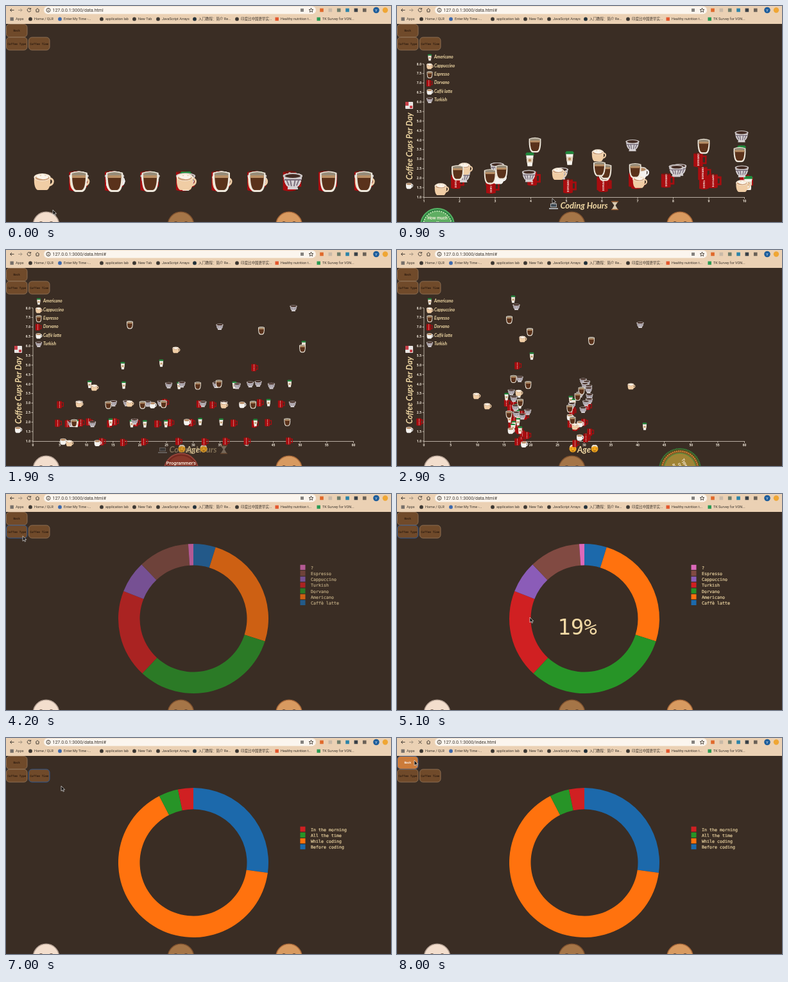
Animation, 600 px wide and 338 px high, one loop 8100 ms. Source, as an HTML page:

```html
<!DOCTYPE html>
<html lang="en">
<head>
<meta charset="utf-8">
<title>Coffee and code</title>
<style>
html, body { margin: 0; width: 100%; height: 100%; overflow: hidden; background: #3a2d24; }
svg { display: block; width: 100%; height: 100%; }
text { white-space: pre; }
.ui { font-family: Roboto, "Noto Sans CJK SC", "Noto Sans CJK", sans-serif; fill: #3b342d; }
.mono { font-family: "DejaVu Sans Mono", monospace; }
.hand { font-family: Lato, sans-serif; font-style: italic; font-weight: 700; fill: #f1d9a5; }
.tick { font-family: "Noto Sans", sans-serif; font-size: 5px; font-weight: 600; fill: #efe6d8; }
</style>
</head>
<body>
<svg id="stage" viewBox="0 0 600 338" preserveAspectRatio="none">
  <defs>
    <g id="americano">
      <path d="M-8-9H8L5 15H-5Z" fill="#f6f3ec"/>
      <path d="M-7.5-3H7.5L6 7H-6Z" fill="#e3d3bd"/>
      <circle cy="2" r="3" fill="#b98b5c"/>
      <path d="M-9-9V-12L-7-15H7L9-12V-9Z" fill="#208a3c"/>
    </g>
    <g id="cappuccino">
      <path d="M8-4C18-6 18 7 7 7" fill="none" stroke="#efcda6" stroke-width="3"/>
      <path d="M-14-6H11C12 6 9 14 5 14H-8C-12 14-15 6-14-6Z" fill="#f0cda5"/>
      <ellipse cx="-1.5" cy="-6" rx="13" ry="6" fill="#f7ead8"/>
      <ellipse cx="-1.5" cy="-5" rx="11" ry="4" fill="#c99a73"/>
      <path d="M-11-6Q-8-12-4-8Q0-13 3-8Q8-10 8-5Q-1 0-11-6Z" fill="#faf4ea"/>
    </g>
    <g id="espresso">
      <path d="M-13-13Q0-18 13-13Q14 17 4 17H-4Q-14 17-13-13Z" fill="#efe9dd"/>
      <path d="M-11-12Q0-16 11-12L10.5-5H-10.5Z" fill="#968b78"/>
      <path d="M-10.5-7H10.5Q10 13 4 14H-4Q-10 13-10.5-7Z" fill="#5a321b"/>
      <path d="M-10.5-9H10.5V-5H-10.5Z" fill="#b98f65"/>
    </g>
    <g id="instant">
      <path d="M4-8H11.5V7H4" fill="none" stroke="#a50e10" stroke-width="3.5"/>
      <path d="M-15-14Q-5-17 5-14V14Q-5 17-15 14Z" fill="#a90d10"/>
      <ellipse cx="-5" cy="-14" rx="9" ry="1.7" fill="#6e1a12"/>
      <text class="ui" transform="translate(-3 13) rotate(-90)" font-size="5.8" font-weight="700" style="fill:#f5e5df">DORVANO</text>
    </g>
    <g id="latte">
      <path d="M9-5C17-7 17 7 8 7" fill="none" stroke="#eee" stroke-width="3"/>
      <path d="M-13-7H11C12 7 8 14 4 14H-7C-12 13-14 6-13-7Z" fill="#f5f3ef"/>
      <ellipse cx="-1" cy="-7" rx="12" ry="5" fill="#d9d3cb"/>
      <ellipse cx="-1" cy="-6.5" rx="10" ry="3.5" fill="#b78a62"/>
    </g>
    <g id="turkish">
      <path d="M-14-8H14Q13 6 7 9L8 13H-8L-7 9Q-13 6-14-8Z" fill="#d5d0d2"/>
      <path d="M-10-3L-6 7M-4-3L-2 8M4-3L2 8M10-3L6 7M-13-2H13" stroke="#756a78" stroke-width="1.8"/>
      <ellipse cy="-8" rx="15" ry="4.5" fill="#c9c3c3"/>
      <ellipse cy="-8" rx="12" ry="3" fill="#422a22"/>
    </g>
    <g id="elder">
      <circle r="5.5" fill="#f3a61c"/>
      <path d="M-5-2Q-4-7 0-6Q4-7 5-2Q2-4 0-4Q-2-4-5-2Z" fill="#e9e1d2"/>
      <path d="M-2.5-.5V.5M2.5-.5V.5M-2 3Q0 4 2 3" fill="none" stroke="#6b3f12" stroke-width=".8"/>
    </g>
  </defs>
</svg>
<script>
const LOOP = 8100, STEP = 100;
const stage = document.getElementById('stage');

function el(tag, attrs = {}, parent = stage, text) {
  const node = document.createElementNS('http://www.w3.org/2000/svg', tag);
  for (const k in attrs) node.setAttribute(k, attrs[k]);
  if (text !== undefined) node.textContent = text;
  parent.appendChild(node);
  return node;
}
const set = (node, k, v) => node.setAttribute(k, v);
const group = (parent = stage) => el('g', {}, parent);
const label = (parent, cls, x, y, size, text, more = {}) =>
  el('text', { class: cls, x, y, 'font-size': size, ...more }, parent, text);
const icon = (parent, id, x, y, s) =>
  el('use', { href: '#' + id, transform: `translate(${x} ${y}) scale(${s})` }, parent);
const clamp = v => Math.max(0, Math.min(1, v));
const ease = v => v * v * (3 - 2 * v);
const mix = (a, b, p) => a + (b - a) * p;
const ramp = (t, a, b) => clamp((t - a) / (b - a));
const pulse = (t, a, b, c, d) => Math.min(ramp(t, a, b), 1 - ramp(t, c, d));
const show = (node, o) => set(node, 'opacity', o);
const frac = v => v - Math.floor(v);
const noise = n => frac(Math.sin(n * 12.9898 + 4.1) * 43758.5453);

// Axes, titles and legend
const CREAM = '#f1d9a5', AXIS = '#d9cfc2';
const chart = group();
const rule = (d, parent) => el('path', { d, fill: 'none', stroke: AXIS, 'stroke-width': .8 }, parent);
const cupsY = v => 299 - (v - 1) * 29.75;
rule('M42 91V299.5H541.5', chart);
for (let v = 1; v <= 8; v += .5) {
  rule(`M39.5 ${cupsY(v)}H42`, chart);
  label(chart, 'tick', 38, cupsY(v) + 1.8, 5, v.toFixed(1), { 'text-anchor': 'end' });
}
function xAxis(first, last, step) {
  const g = group(chart);
  for (let v = first; v <= last; v += step) {
    const x = 42 + (v - first) / (last - first) * 499.5;
    rule(`M${x} 299V302`, g);
    label(g, 'tick', x, 306.5, 5, v, { 'text-anchor': 'middle' });
  }
  return g;
}
const hourAxis = xAxis(1, 10, 1), ageAxis = xAxis(0, 60, 5);

label(chart, 'hand', 0, 0, 12.3, 'Coffee Cups Per Day',
  { transform: 'translate(24 219.5) rotate(-90)', 'text-anchor': 'middle' });
el('rect', { x: 13, y: 150, width: 12, height: 11, rx: 1, fill: '#e9e5e3' }, chart);
el('path', { d: 'M13 150H18V156H13ZM20 156H24V160H20Z', fill: '#c9414a' }, chart);
icon(chart, 'latte', 19, 281, .38);

const hourTitle = group(chart);
label(hourTitle, 'hand', 291.5, 317, 13, 'Coding Hours', { 'text-anchor': 'middle' });
el('path', { d: 'M239 309H249V315H239ZM237 316H251V318H237Z', fill: '#a9adb1' }, hourTitle);
el('path', { d: 'M240 310H248V314H240Z', fill: '#3f4b55' }, hourTitle);
el('path', { d: 'M335 307H344L340.5 312L344 318H335L338.5 312Z', fill: '#d8c8ae' }, hourTitle);
el('path', { d: 'M334 306H345M334 318.5H345', stroke: '#a5683a', 'stroke-width': 1.6 }, hourTitle);
const ageTitle = group(chart);
label(ageTitle, 'hand', 291.5, 317, 13, 'Age', { 'text-anchor': 'middle' });
icon(ageTitle, 'elder', 274, 311, 1);
icon(ageTitle, 'elder', 308, 311, 1);

['Americano', 'Cappuccino', 'Espresso', 'Dorvano', 'Caffè latte', 'Turkish'].forEach((name, i) => {
  const id = ['americano', 'cappuccino', 'espresso', 'instant', 'latte', 'turkish'][i], y = 80.5 + i * 13.4;
  icon(chart, id, 51, y, .34);
  label(chart, 'hand', 58, y + 1.7, 6.5, name);
});

// Cups: a crowd by rule, plus a few that stand alone as x, y in each of three views.
// cols: hour columns in use; rows: cups per day; low/high: extent of the last view
const kinds = {
  instant: { n: 26, cols: [2, 3, 4, 5, 6, 7, 8, 9, 10, 6, 9, 3, 7], mid: 277, rows: [1, 3], high: 238, low: 304,
    solo: [[473, 241, 388, 184, 189, 181], [480, 262, 82, 271, 36, 269]] },
  americano: { n: 14, cols: [7, 7, 10], mid: 268, rows: [2, 4], high: 223, low: 284,
    solo: [[207, 240, 182, 181, 181, 77], [269, 238, 242, 177, 386, 276], [537, 229, 464, 148, 210, 166]] },
  latte: { n: 5, cols: [3, 7], mid: 263, rows: [1, 3], high: 256, low: 309, solo: [] },
  turkish: { n: 18, cols: [2, 3, 4, 5, 8, 8, 8, 10], mid: 261, rows: [2, 4], high: 200, low: 262,
    solo: [[367, 218, 333, 120, 379, 117], [537, 204, 448, 91, 186, 89]] },
  cappuccino: { n: 2, cols: [7, 10], mid: 272, rows: [3, 4], high: 197, low: 302,
    solo: [[69, 286, 138, 215, 124, 228], [106, 254, 265, 156, 196, 139], [314, 233, 193, 240, 365, 213], [252, 262, 99, 302, 141, 244]] },
  espresso: { n: 8, cols: [2, 3, 3, 6, 6, 6, 7], mid: 263, rows: [2, 4], high: 197, low: 271,
    solo: [[215, 217, 193, 117, 175, 109], [478, 219, 398, 126, 207, 128], [534, 232, 462, 154, 303, 142]] }
};
const cupLayer = group(), cups = [];
function addCup(id, v) {
  const col = Math.round((v[0] - 42) / 55.5);
  cups.push({ node: el('use', { href: '#' + id }, cupLayer), stops: [58 + 55.55 * col, 274, ...v] });
}
Object.entries(kinds).forEach(([id, k], seed) => {
  for (let i = 0; i < k.n; i++) {
    const slot = i % k.cols.length, r = j => noise(seed * 100 + i + j * .37);
    const [least, most] = k.rows, row = least + Math.floor(r(1) * (most - least + 1));
    addCup(id, [
      42 + 55.5 * (k.cols[slot] - 1) + (noise(seed + slot) - .5) * 20,
      k.mid + (noise(seed + slot * 3) - .5) * 18,
      85 + 365 * frac(i * .618 + seed * .27), cupsY(row) + r(2) * 4 - 1,
      (r(3) < .62 ? 188 : 287) + (r(4) - .5) * 36, mix(k.high, k.low, (i + .5) / k.n)
    ]);
  }
  k.solo.forEach(v => addCup(id, v));
});

// Rings
const BLUE = '#1c69ab', ORANGE = '#ff720e', GREEN = '#279427', RED = '#d02022';
const PURPLE = '#8b5cb8', BROWN = '#814a42', PINK = '#dc69b9';
function ring(parts) {
  const g = group();
  let from = 0;
  const at = (p, r) => {
    const a = p / 100 * Math.PI * 2;
    return `${292 + r * Math.sin(a)} ${195 - r * Math.cos(a)}`;
  };
  for (const [share, fill] of parts) {
    const to = from + share, big = share > 50 ? 1 : 0;
    el('path', { fill, d: `M${at(from, 117)}A117 117 0 ${big} 1 ${at(to, 117)}L${at(to, 83.5)}A83.5 83.5 0 ${big} 0 ${at(from, 83.5)}Z` }, g);
    from = to;
  }
  return g;
}
function key(rows, top) {
  const g = group();
  rows.forEach(([name, fill], i) => {
    const y = top + i * 9.2;
    el('rect', { x: 458.5, y, width: 8, height: 8, fill }, g);
    label(g, 'mono', 475, y + 7, 6.65, name, { fill: CREAM, stroke: CREAM, 'stroke-width': .15 });
  });
  return g;
}
const typeRing = ring([[4.8, BLUE], [25.1, ORANGE], [32, GREEN], [19.1, RED], [6.9, PURPLE], [11, BROWN], [1.1, PINK]]);
const timeRing = ring([[27.2, BLUE], [65.3, ORANGE], [4.2, GREEN], [3.3, RED]]);
const typeKey = key([['?', PINK], ['Espresso', BROWN], ['Cappuccino', PURPLE], ['Turkish', RED],
  ['Dorvano', GREEN], ['Americano', ORANGE], ['Caffè latte', BLUE]], 110.8);
const timeKey = key([['In the morning', RED], ['All the time', GREEN], ['While coding', ORANGE], ['Before coding', BLUE]], 138.6);
const percent = label(stage, 'mono', 281, 220, 34, '19%', { 'text-anchor': 'middle', fill: CREAM });

// Round buttons along the bottom edge
[[62.5, '#f3decd', '#b5a295'], [272.5, '#a57547', '#81532f'], [441, '#d89a60', '#a8693a']].forEach(([x, fill, stroke]) => {
  el('circle', { cx: x, cy: 342.5, r: 20.2, fill, stroke, 'stroke-width': 1.4 });
  el('path', { d: `M${x - 11} 338.5q3-2 6 0M${x + 5} 338.5q3-2 6 0`, fill: 'none', stroke: '#4a3324' });
});
function hover(x, y, rings, lines, size, turn) {
  const g = group();
  for (const [r, fill, stroke, dash] of rings)
    el('circle', { r, fill, stroke, 'stroke-width': 1.8, 'stroke-dasharray': dash }, g);
  const words = el('g', { transform: `rotate(${turn})` }, g);
  lines.forEach((s, i) => label(words, 'ui', 0, -9 + i * 8, size, s,
    { 'text-anchor': 'middle', style: 'fill:#fff3e4', 'font-weight': 500 }));
  return p => {
    set(g, 'transform', `translate(${x} ${y}) scale(${mix(.76, 1, p)})`);
    show(g, p);
  };
}
const hovers = [
  hover(63, 343, [[26, '#2f8242', '#57b465', 'none'], [22, '#5fae62', '#c4e8b5', '2 1.5']], ['How much', 'coffee'], 6.5, 0),
  hover(273, 345, [[26.5, '#74291f', '#93443a', 'none'], [22, '#86382a', '#86382a', 'none']], ["Programmer's"], 7.4, 0),
  hover(441, 343, [[32, '#4f4a20', '#2f9440', '1.5 1'], [28.5, '#8a5a25', '#e08a35', '2 1.2'], [25, '#a08435', '#3f9a43', '1.5 1.2']],
    ['Types of', 'coffee', 'and time'], 6.5, 62)
];

// Page buttons
function button(x, y, text) {
  const box = el('rect', { x: x + .5, y: y + .5, width: 32.5, height: 20, rx: 5, 'stroke-width': 1 });
  const cap = label(stage, 'mono', x + 16.7, y + 12.2, 4.4, text, { 'text-anchor': 'middle', 'font-weight': 700 });
  return (focus, lit) => {
    set(box, 'fill', lit ? '#cb7b3a' : '#704a2a');
    set(box, 'stroke', focus ? '#31598f' : '#8b6d51');
    set(cap, 'fill', lit ? '#fff' : '#2d1c10');
  };
}
const back = button(0, 28, 'Back'), typeBtn = button(0, 48.5, 'Coffee Type'), timeBtn = button(35, 48.5, 'Coffee Time');

// Browser bars
el('rect', { width: 600, height: 28, fill: '#ebd1b4' });
el('rect', { x: 59, y: .5, width: 424, height: 12, rx: 6, fill: '#fbf5ee' });
const line = (d, stroke = '#4a433b') => el('path', { d, fill: 'none', stroke, 'stroke-width': 1 });
line('M12.5 6.5H6.5M9 4L6.5 6.5L9 9');
line('M19 6.5H25M22.5 4L25 6.5L22.5 9', '#a0917f');
const reload = line('M38.2 4.6A2.8 2.8 0 1 0 38.7 7M38.6 3V5.2H36.4');
const stop = line('M33.5 4L38.5 9M38.5 4L33.5 9');
line('M46 6.5L49 3.8L52 6.5M47 6V9.2H51V6');
line('M66 5.8V8.2M66 4.3V5M63 6.5A3 3 0 1 0 69 6.5A3 3 0 1 0 63 6.5');
const url = label(stage, 'ui', 72.5, 8.9, 7, '');
el('rect', { x: 459, y: 4, width: 5, height: 5, fill: '#85827e' });
line('M475.5 3.2L476.4 5.5L478.8 5.7L477 7.3L477.6 9.6L475.5 8.3L473.4 9.6L474 7.3L472.2 5.7L474.6 5.5Z');
['#e0692b', '#c9b9a7', '#6e7d6c', '#2c84a8', '#394047', '#6a6158'].forEach((fill, i) =>
  el('rect', { x: 489.2 + i * 13.35, y: 3.7, width: 5.6, height: 5.6, fill }));
el('circle', { cx: 577, cy: 6.5, r: 4.8, fill: '#1d5d9b' });
label(stage, 'ui', 577, 8.5, 5.5, 'Y', { 'text-anchor': 'middle', style: 'fill:#fff' });
el('circle', { cx: 591, cy: 6.5, r: 4.2, fill: '#efa634' });
const INK = '#3d3833';
[[15, 'Apps', '#77706a'], [44, 'Home / QLR', INK], [90, 'Enter My Time -...', '#3d69ad'], [155, 'application lab', INK],
 [206, 'New Tab', INK], [243, 'JavaScript Arrays', INK], [300, '入门教程：简介 Re...', '#22313b'],
 [366, '印度比中国更早实...', INK], [428, 'Healthy nutrition t...', '#e4572e'],
 [493, 'TK Survey for VON...', '#2a9a53']].forEach(([x, name, fill], i) => {
  if (i === 0 || i > 7) el('rect', { x: x - 8.5, y: 17.7, width: 5.4, height: 5.4, fill });
  else el('circle', { cx: x - 6, cy: 20.4, r: 2.9, fill });
  label(stage, 'ui', x, 22.4, 5.5, name);
});

// Pointer moves: start, end, then where to
const pointer = el('path', { d: 'M0 0V8L1.9 6.3L3.2 9L4.5 8.4L3.2 5.8H5.7Z', fill: '#161311', stroke: '#fff', 'stroke-width': .6 });
const moves = [[0, 250, 66, 333], [500, 900, 242, 301], [900, 1150, 272, 341], [2000, 2500, 440, 341], [3200, 3700, 18, 60],
  [4100, 4900, 207, 193], [5300, 5850, 50, 61], [6000, 6300, 86, 75], [7000, 7700, 27, 35]];
const pointerAt = t => moves.reduce(([x, y], [a, b, toX, toY]) => {
  const p = ease(ramp(t, a, b));
  return [mix(x, toX, p), mix(y, toY, p)];
}, [73, 319]);

function draw(t) {
  const legs = [[300, 800], [1350, 1850], [2300, 2900]].map(([a, b]) => ease(ramp(t, a, b)));
  const size = mix(mix(1, .72, legs[0]), .38, legs[1]);
  for (const { node, stops } of cups) {
    const [x, y] = [0, 1].map(k => legs.reduce((v, p, i) => mix(v, stops[i * 2 + 2 + k], p), stops[k]).toFixed(2));
    set(node, 'transform', `translate(${x} ${y}) scale(${size.toFixed(3)})`);
  }
  const leave = 1 - ramp(t, 3700, 4000);
  show(cupLayer, leave);
  show(chart, ramp(t, 300, 700) * leave);
  const age = ramp(t, 1500, 2150), axis = ramp(t, 1350, 1900);
  show(hourAxis, 1 - axis);
  show(ageAxis, axis);
  show(hourTitle, 1 - age);
  show(ageTitle, Math.sqrt(age));

  const enter = ramp(t, 3900, 4300), swap = ramp(t, 6000, 6600);
  show(typeRing, enter * (1 - swap));
  show(timeRing, swap);
  show(typeKey, t < 6000 ? enter : 0);
  show(timeKey, Math.pow(swap, 1.5));
  show(percent, t >= 4800 && t < 5500 ? 1 : 0);

  hovers[0](pulse(t, 150, 350, 900, 1100));
  hovers[1](pulse(t, 1050, 1250, 2000, 2200));
  hovers[2](pulse(t, 2350, 2600, 3200, 3400));

  back(t >= 7700, t >= 7600);
  typeBtn(t >= 3700 && t < 5900, false);
  timeBtn(t >= 5900 && t < 7700, false);
  const leaving = t >= 7800;
  url.textContent = '127.0.0.1:3000/' + (leaving ? 'index.html' : t < 300 ? 'data.html' : 'data.html#');
  show(reload, leaving ? 0 : 1);
  show(stop, leaving ? 1 : 0);
  set(pointer, 'transform', `translate(${pointerAt(t)})`);
}

function tick() {
  const t = performance.now() % LOOP;
  draw(Math.floor(t / STEP) * STEP);
  requestAnimationFrame(tick);
}
tick();
</script>
</body>
</html>
```
